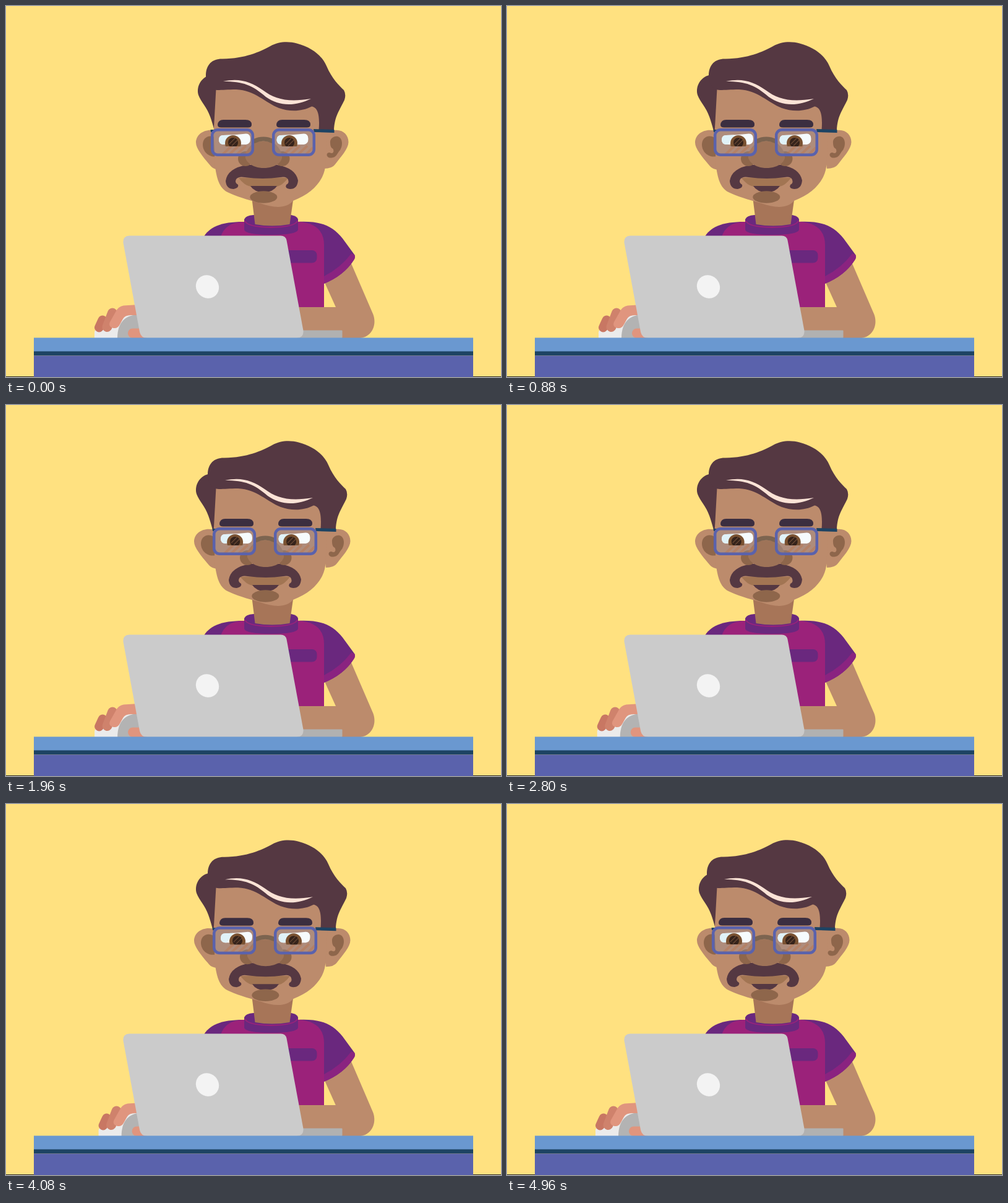
These frames come from a looping animation (800x600 px, 5 s). An HTML page:

```html
<!DOCTYPE html>
<html lang="en">
<head>
<meta charset="utf-8">
<title>At the laptop</title>
<style>
html, body { margin: 0; width: 100%; height: 100%; overflow: hidden; background: #ffe180; }
svg { display: block; width: 100vw; height: 100vh; }
.skin { fill: #bc8b6c; }
.shade { fill: #8e664b; }
.hair { fill: #553842; }
.plum { fill: #6a287e; }
.pink { fill: #9b227a; }
.hand { fill: #e0957e; }
.navy { fill: #1d4363; }
.line { fill: none; stroke-linecap: round; }
</style>
</head>
<body>
<svg viewBox="0 0 800 600">
  <defs>
    <clipPath id="lid"><rect x="330" y="200" width="80" height="27"/></clipPath>
    <clipPath id="lens"><rect x="333" y="200" width="66" height="41" rx="9"/></clipPath>
    <path id="brow" fill="#3b2e40" d="M351 184H387Q397 184 397 192Q397 196.500 391 196.500H348Q342 196.500 342 192Q343 184 351 184Z"/>
    <g id="glass" clip-path="url(#lens)">
      <path fill="#968e96" fill-opacity=".38" d="M330 198H402V243H330Z"/>
      <path d="M348 242L365 226M359 242L376 226M371 242L388 226M384 242L397 229" stroke="#bd7448" stroke-opacity=".42" stroke-width="4"/>
    </g>
    <g id="eye">
      <path fill="#f6fbfd" d="M351 209Q370 208.500 388 206.500Q395 206.500 395 215Q395 223 388 224H351Q344 223 344 216.500Q344 209 351 209Z"/>
      <path fill="#e0f2f8" d="M351 209L364 208.500L354 224H351Q344 223 344 216.500Q344 209 351 209Z"/>
    </g>
    <g id="iris" clip-path="url(#lid)">
      <g id="pupil">
        <circle cx="367" cy="222" r="13" fill="#7a5232"/>
        <circle cx="367" cy="221" r="8" fill="#35231b"/>
        <path d="M361 223L370 214M365 226L374 217" stroke="#6b4a35" stroke-width="1.200"/>
      </g>
    </g>
    <rect id="frame" x="333.200" y="200.200" width="65.600" height="40.600" rx="9" fill="none" stroke="#5a62ac" stroke-width="4.500"/>
  </defs>

  <rect width="800" height="600" fill="#ffe180"/>
  <rect y="599" width="800" height="1" fill="#2b2b2b"/>

  <path id="arm" class="skin"/>

  <path class="plum" d="M318 376C328 356 350 348 390 349L400 380Z"/>
  <path class="plum" d="M470 349C506 347 527 354 544 376L563 402Q565.500 406 562 411Q546 436 514 449L490 380Z"/>
  <path fill="#8a2380" d="M558 400.500L563 402Q565.500 406 562 411Q546 436 514 449V437Q540 424 558 400.500Z"/>
  <path class="pink" d="M346 376C352 356 365 349 388 349H472C500 350 514 364 514 386V487H346Z"/>
  <rect class="plum" x="436" y="395" width="66.500" height="20.500" rx="8"/>
  <path class="plum" d="M385 345Q387 339 400 338H461Q471 340 472 345V362Q469 370 428.500 370Q388 370 385 362Z"/>
  <path fill="#a77558" d="M396 300L402.500 353Q430 358 458.500 353L466 300Z"/>
  <path d="M386 347.500Q390 357.500 428.500 358Q467 357.500 471 347.500" fill="none" stroke="#9b227a" stroke-width="2"/>

  <g id="head">
    <g class="turn" data-k="-1">
      <path class="skin" d="M340 202C322 197 307 207 307 221C307 231 320 246 331 259Q335 264 345 265Z"/>
      <path class="shade" d="M340 214C329 206 318 213 318 224C318 237 330 246 341 243Z"/>
      <path class="hair" d="M334 111C316 113 307 130 311 144C315 155 325 164 330 179Q333 187 337 202L350 190V112Z"/>
    </g>
    <g class="turn" data-k="1">
      <path class="skin" d="M505 203L530 201C545 199 553.500 209 553.500 220C553.500 231 541 244 532 256Q527 263 514 263Z"/>
      <path class="shade" d="M524 222C523 214 530 210 536 211C544 213 545 225 540 233C534 239 535 246 523 245.500C517 244 517 237 523 237C528 240 531 236 528.500 231Q524 229 524 222Z"/>
    </g>
    <path class="skin" d="M340 125L335.500 205L338 260C341 282 346 296 360 302C380 311 398 315 411 319C433 327 453 328 464 315C495 303 513 283 516 260L520 200L510 125Z"/>
    <g class="turn" data-k="1">
      <path class="hair" d="M323 113C323 94 334 85 350 85.500C387 85 410 74 427 65C441 57 457 57 470 60.500C495 67 511 81 518 97C527 118 538 128 546 136Q550 143 547 152C539 169 531 178 530 201H505.500C507 182 506 164 494 162.500C478 171 458 171 441 165C420 157 402 136 372 135C358 135 350 136 341 136C330 136 323 125 323 113Z"/>
      <path fill="#fbe3d6" d="M351 122C378 116 396 123 415 136C435 151 455 156 493 150C466 163 441 162 420 147C398 128 384 122 351 122Z"/>
      <use href="#brow"/>
      <use href="#brow" x="95"/>
      <path class="navy" d="M497 199L530.500 200V205L498 204ZM330.500 200H338V204H331Z"/>
      <path fill="#a27553" d="M376 278Q416 276 456 278Q447 290 438 292H395Q385 290 376 278Z"/>
      <path class="hair" d="M395 291H438Q432 301 416.500 301Q401 301 395 291Z"/>
      <ellipse class="shade" cx="416.300" cy="309" rx="22" ry="9.700"/>
    </g>
    <path class="hair turn" data-k="1.660" d="M390 257Q358 262 355 283Q356 296 368 296Q377 294 375 289Q369 286 372 280Q376 275 386 277Q415 281 443 277Q454 275 456 281Q458 287 453 289Q450 295 459 296Q471 296 472 282Q468 262 438 257Z"/>
    <g class="turn" data-k="1">
      <circle class="shade" cx="387" cy="247" r="12"/>
      <circle class="shade" cx="446.500" cy="247" r="12"/>
      <path fill="#9e7358" d="M401 221C392 227 386 238 387 246C391 257 404 262 416.500 262C429 262 443 257 446 246C447 238 441 227 432 221Q416.500 217 401 221Z"/>
      <path d="M400 219Q416 211 432 219" fill="none" stroke="#7c6450" stroke-width="7"/>
      <use href="#glass"/>
      <use href="#glass" x="99"/>
      <use href="#eye"/>
      <use href="#eye" x="93.500"/>
      <use href="#iris"/>
      <use href="#iris" x="91"/>
      <use href="#frame"/>
      <use href="#frame" x="99"/>
    </g>
  </g>

  <g id="mouse">
    <path fill="#ebebeb" d="M143 537V527C150 512 172 499 208 499V537Z"/>
    <path fill="#b3b3b3" d="M180 537C180 515 190 500 212 499.500H240V537Z"/>
    <path class="line" stroke="#c87763" stroke-width="15" d="M156 508L150.500 520"/>
    <path class="line" stroke="#cf826c" stroke-width="16" d="M172 496.500L163.500 519"/>
    <path id="tap" class="hand" d="M230 482L190 484.500Q181 486 177 495L168 511Q165 518 172 520.500Q180 523 184 515L189 506Q192 500 202 500H230Z"/>
    <rect class="hand" x="197" y="521.500" width="44" height="15.500" rx="7.500"/>
  </g>

  <rect x="465" y="524.500" width="78.500" height="12.500" rx="1" fill="#b1b1b1"/>
  <path fill="#cbcbcb" d="M199 371.500H444Q452 371.500 453.500 379L480.500 525Q481.500 536.500 470 537H228Q218 537 216 527L189.500 383Q188.500 372 199 371.500Z"/>
  <ellipse cx="325.500" cy="454" rx="19.300" ry="18" transform="rotate(45 325.500 454)" fill="#f3f3f3"/>

  <rect x="45" y="536.500" width="710" height="23" fill="#6a98d0"/>
  <rect class="navy" x="45" y="558.500" width="710" height="7"/>
  <rect x="45" y="565.500" width="710" height="34.500" fill="#5a62ac"/>
</svg>
<script>
const LOOP = 5000, STEP = 40, BEAT = 1000;
const $ = id => document.getElementById(id);
const turning = [...document.querySelectorAll('.turn')];

// Eased 0 to 1 between times a and b.
function ramp(t, a, b) {
  const p = Math.min(1, Math.max(0, (t - a) / (b - a)));
  return (1 - Math.cos(Math.PI * p)) / 2;
}

// Rises from a to b, holds, falls from c to d.
const pulse = (t, a, b, c, d) => ramp(t, a, b) - ramp(t, c, d);
const click = (t, start) => pulse(t, start, start + 180, start + 180, start + 360);

const move = (id, x, y = 0) => $(id).setAttribute('transform', `translate(${x} ${y})`);

function draw(t) {
  const turn = 3 * pulse(t, 0, 600, 4300, 4920);
  const bob = 2.1 * pulse(t % BEAT, 0, 400, 400, 800);
  const first = pulse(t, 560, 880, 1640, 2000);
  const second = pulse(t, 2400, 3300, 4080, 4480);
  const press = click(t, 160) + click(t, 4560);

  move('head', 0, bob);
  for (const el of turning) el.setAttribute('transform', `translate(${turn * el.dataset.k} 0)`);
  move('pupil', 4 * (first + second * second));
  move('mouse', 5 * first + 6.6 * second);
  $('tap').setAttribute('transform', `rotate(${-3 * press} 202 490)`);

  const e = -0.9 * bob;
  $('arm').setAttribute('d',
    `M505 425L${533 + e} 487H465V537H${570 + e}C${590 + e} 537 ${600 + e} 517 ${593.5 + e} 499L556 412Z`);
}

function tick() {
  const t = performance.now() % LOOP;
  draw(Math.floor(t / STEP) * STEP);
  requestAnimationFrame(tick);
}
tick();
</script>
</body>
</html>
```
